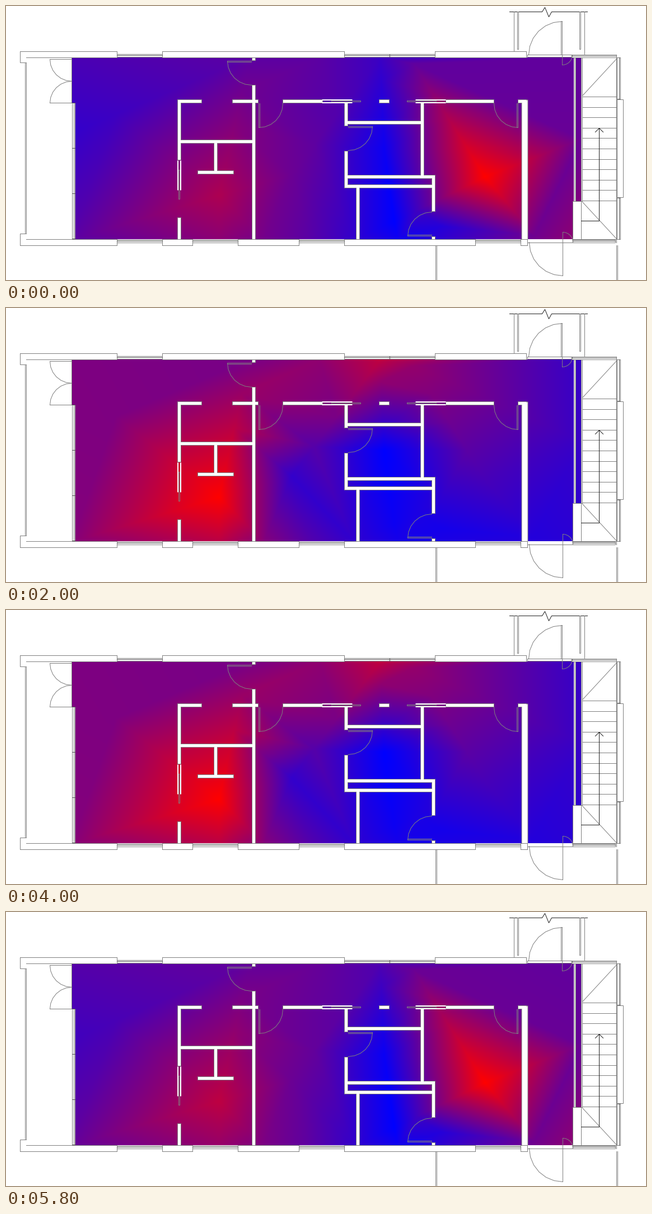
A matplotlib script for the animation above (6 s loop, 1143 px wide and 490 px high).

```python
import numpy as np
import matplotlib.pyplot as plt
from matplotlib.animation import FuncAnimation
from matplotlib.patches import Rectangle
from matplotlib.tri import Triangulation, LinearTriInterpolator

W, H, DPI = 1143, 490, 100
FRAMES, INTERVAL = 30, 200
PX = 72 / DPI
GRAY, DARK, BLACK = "#808080", "#585858", "#202020"
RIGHT, DOWN, LEFT, UP = 0, 90, 180, 270

fig = plt.figure(figsize=(W / DPI, H / DPI), dpi=DPI, facecolor="white")
ax = fig.add_axes([0, 0, 1, 1])

# Each sensor: place, then its heat (0 blue, 1 red) at the key steps
KEY_STEPS = [0, 5, 10, 14]
SENSORS = {
    "west": ((116, 228), (.20, .46, .50, .12)),
    "hall": ((435, 92), (.36, .50, .47, .40)),
    "bath": ((380, 338), (.68, 1, 1, 1)),
    "room": ((510, 300), (.42, .41, .20, .32)),
    "lobby": ((560, 92), (.36, .55, .56, .55)),
    "window": ((668, 92), (.23, .62, .75, .60)),
    "corner": ((728, 104), (.38, .57, .58, .50)),
    "closet": ((675, 255), (.05, 0, 0, .33)),
    "store": ((693, 385), (0, 0, .05, .50)),
    "office": ((855, 305), (1, 1, .28, 0)),
    "northeast": ((1027, 92), (.38, .37, .21, .32)),
    "east": ((1027, 238), (.41, .40, .22, .26)),
    "southeast": ((1027, 418), (.58, .58, .17, .13)),
}
# Pairs joined by a straight crease in the heat surface
CREASES = ["west hall", "hall bath", "room window", "closet window",
           "corner office", "corner east", "office store", "store southeast"]


def heat_nodes():
    places = np.array([p for p, _ in SENSORS.values()], float)
    heats = np.array([h for _, h in SENSORS.values()], float)
    nodes = list(zip(places, heats))
    names = list(SENSORS)
    for pair in CREASES:
        a, b = (names.index(n) for n in pair.split())
        for u in (.25, .5, .75):
            nodes.append(((1 - u) * places[a] + u * places[b],
                          (1 - u) * heats[a] + u * heats[b]))
    # Border without sensors: weighted by inverse squared distance
    border = [(116, 92), (116, 418)]
    border += [(x, 418) for x in np.linspace(380, 700, 5)]
    for p in border:
        w = 1 / ((places - p) ** 2).sum(axis=1)
        nodes.append((p, w @ heats / w.sum()))
    return map(np.array, zip(*nodes))


node_xy, node_heat = heat_nodes()
tri = Triangulation(*node_xy.T)
gx, gy = np.meshgrid(np.arange(117, 1027), np.arange(93, 417))
fields = [np.ma.filled(LinearTriInterpolator(tri, h)(gx, gy), .4)
          for h in node_heat.T]


def heat_rgb(step):
    pos = np.interp(step, KEY_STEPS, range(len(KEY_STEPS)))
    k = min(int(pos), len(KEY_STEPS) - 2)
    v = fields[k] + (pos - k) * (fields[k + 1] - fields[k])
    return np.dstack([v, 0 * v, 1 - v]).clip(0, 1)


heat = ax.imshow(heat_rgb(0), extent=(116.5, 1026.5, 416.5, 92.5),
                 interpolation="nearest", aspect="auto", zorder=1)
ax.set_xlim(-0.5, W - 0.5)
ax.set_ylim(H - 0.5, -0.5)
ax.axis("off")


def path(*pts, color=GRAY, width=1, z=5):
    return ax.plot(*zip(*pts), color=color, lw=width * PX, zorder=z,
                   snap=False, solid_capstyle="projecting",
                   solid_joinstyle="miter")[0]


def hline(y, x0, x1, color=GRAY, **kw):
    path((x0, y), (x1, y), color=color, **kw)


def vline(x, y0, y1, color=GRAY, **kw):
    path((x, y0), (x, y1), color=color, **kw)


def box(x0, y0, x1, y1):
    path((x0, y0), (x1, y0), (x1, y1), (x0, y1), (x0, y0))


def blank(x0, y0, x1, y1):
    ax.add_patch(Rectangle((x0 - .5, y0 - .5), x1 - x0, y1 - y0, fc="white",
                           lw=0, snap=False, zorder=2))


floor = Rectangle((116.5, 92.5), 910, 324, transform=ax.transData)


def wall(*pts, width=7):
    """A white wall along its centre line, outlined where it meets the floor."""
    path(*pts, color=GRAY, width=width, z=3).set_clip_path(floor)
    path(*pts, color="white", width=width - 2, z=4).set_clip_path(floor)


def door(x, y, r, leaf, free, thick=2):
    """Leaf standing in one direction, arc to where it closes."""
    ray = lambda a: np.array([np.cos(np.radians(a)), np.sin(np.radians(a))])
    hinge, shift = np.array([x, y]), thick * ray(free)
    tip = hinge + r * ray(leaf)
    path(hinge, tip, tip + shift, hinge + shift)
    turn = (free - leaf + 180) % 360 - 180
    path(*(hinge + r * ray(leaf + turn * u) for u in np.linspace(0, 1, 7)))


def window(x0, x1, y):
    box(x0, y, x1, y + 5)
    hline(y + 2, x0, x1, DARK)


def facade(outer, inner, glass, openings, end):
    x = 25
    for x0, x1 in openings + [(end, None)]:
        hline(outer, x, x0)
        hline(inner, max(x, 36), x0)
        vline(x0, outer, inner)
        if x1:
            vline(x1, outer, inner)
            window(x0, x1, glass)
            x = x1


# Floor edges
blank(117, 173, 123, 417)
blank(1014, 93, 1018, 349)
blank(1012, 349, 1027, 417)

# Inner walls, west to east
wall((309, 272), (309, 170), (346, 170))
wall((309, 381), (309, 420))
wall((309, 242), (442, 242))
wall((374, 242), (374, 297))
wall((345, 297), (403, 297))
wall((442, 90), (442, 94))
wall((442, 144), (442, 420))
wall((407, 170), (447, 170))
wall((497, 170), (562, 170))
wall((607, 176), (607, 211))
wall((607, 208), (743, 208))
wall((607, 262), (607, 322), (763, 322))
wall((628, 322), (628, 420))
wall((669, 170), (681, 170))
wall((743, 176), (743, 305))
wall((607, 305), (763, 305), (763, 364))
wall((763, 415), (763, 420))
wall((788, 170), (868, 170))
wall((917, 170), (926, 170))
wall((926, 173), (926, 430), width=12)

# Pocket doors
for x0, x1, slide in [(565, 617, 16), (732, 784, -16)]:
    for y in (167.5, 172.5):
        hline(y, x0, x1, "white", width=2, z=4)
    box(x0 + slide, 169, x1 + slide, 171)
for x in (306.5, 311.5):
    vline(x, 277, 328, "white", width=2, z=4)
box(308, 293, 310, 345)

# Outer walls
facade(81, 92, 86, [(198, 279), (604, 766)], 929)
facade(428, 417, 418, [(x, x + 81) for x in (198, 333, 523, 838)], 931)
vline(685, 86, 91, DARK)
path((25, 81), (25, 101), (36, 101), (36, 407), (25, 407), (25, 428))
vline(34, 101, 407)

# Glazed west side
vline(117, 93, 173)
for x in (118, 121, 123):
    vline(x, 173, 416)
for y in np.linspace(173, 416, 4):
    hline(round(y), 118, 123, DARK)

# Doors
door(117, 95, 39, LEFT, DOWN, 0)
door(117, 173, 39, LEFT, UP, 0)
door(438, 98, 43, LEFT, DOWN)
door(451, 174, 43, DOWN, RIGHT)
door(611, 215, 43, RIGHT, DOWN)
door(914, 174, 43, DOWN, LEFT)
door(760, 411, 43, LEFT, UP)
door(993, 87, 60, UP, LEFT)
door(993, 87, 18, DOWN, RIGHT, 0)
door(994, 422, 60, DOWN, LEFT, 0)
door(994, 422, 18, UP, RIGHT, 0)

# Porch
path((899, 10), (957, 10), (962, 2), (969, 19), (974, 10), (1038, 10),
     color=BLACK)
vline(907, 10, 81)
vline(1033, 10, 87)
for x in (913, 1024):
    box(x, 10, x + 2, 77)
hline(81, 907, 929)

# East side
box(931, 87, 1010, 91)
window(1010, 1090, 87)
window(1012, 1088, 418)
vline(1090, 87, 423)
for y in (92, 343):
    box(1091, y, 1097, y + 74)
    vline(1095, y, y + 74, DARK)
box(1091, 167, 1102, 342)
for x in (1015, 1017):
    vline(x, 93, 348)
vline(1012, 349, 417)
hline(349, 1012, 1029)
hline(417, 1012, 1090)
hline(423, 931, 1012)

# Stairs
vline(1027, 93, 417)
vline(1029, 93, 348)
for y in np.linspace(162, 348, 11):
    hline(round(y), 1029, 1090)
path((1090, 94), (1029, 160))
path((1029, 350), (1090, 416))
path((1027, 384), (1059, 384), (1059, 218), color=BLACK)
path((1052, 225), (1059, 218), (1066, 225), color=BLACK)

# Lines running off below
for x in (767, 769, 1090, 1092):
    vline(x, 428, H)


def update(i):
    heat.set_data(heat_rgb(min(i, FRAMES - i)))
    return [heat]


anim = FuncAnimation(fig, update, frames=FRAMES, interval=INTERVAL,
                     repeat=True, repeat_delay=0)
plt.show()
```
